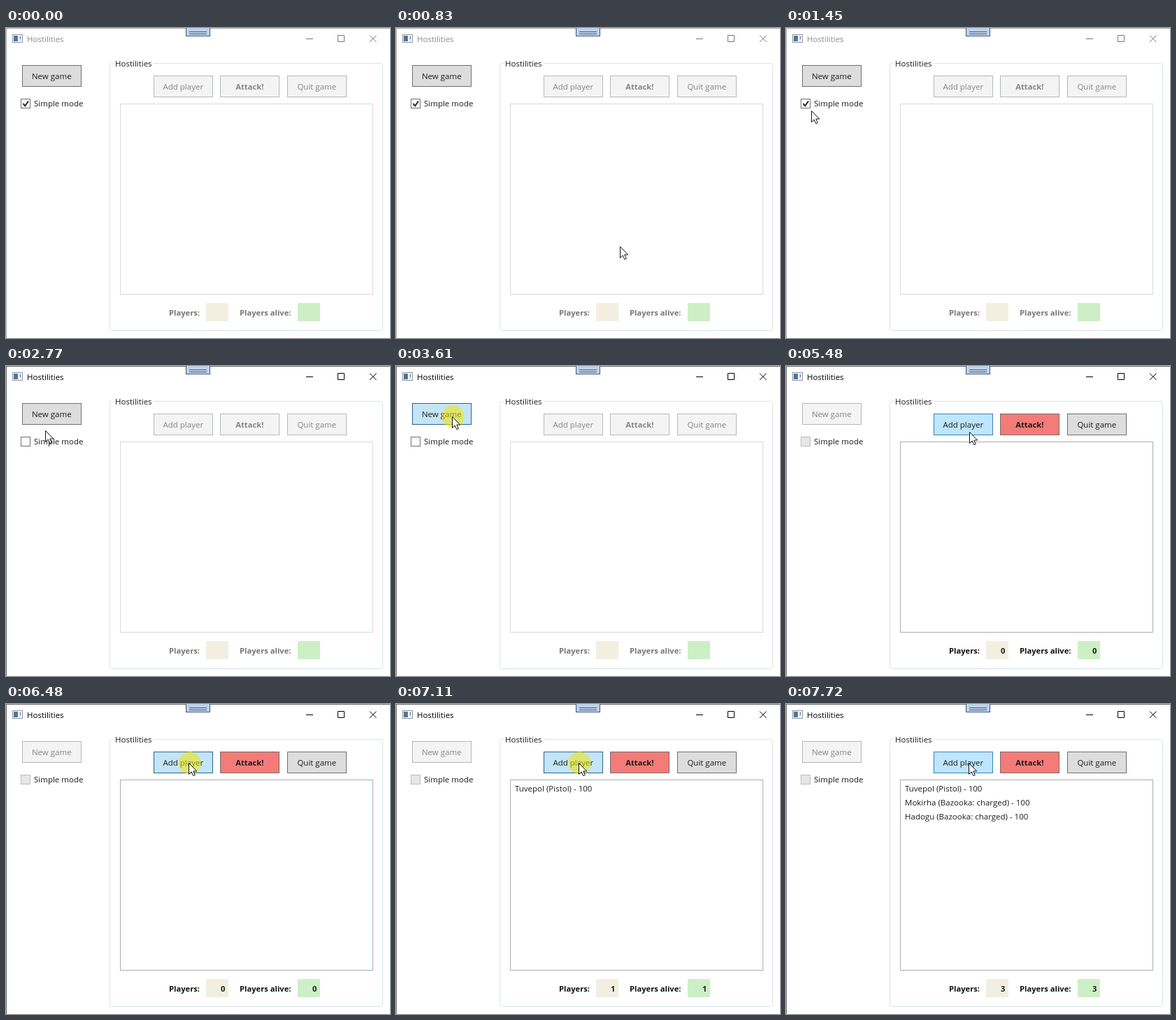
An HTML page that plays this animation: 549 by 443 pixels, repeating every 8 s.

```html
<!DOCTYPE html>
<html lang="en">
<head>
<meta charset="utf-8">
<title>Hostilities</title>
<style>
  html, body { margin: 0; width: 100%; height: 100%; overflow: hidden; background: #fff; }
  svg { display: block; }
  text { font: 11.5px "Open Sans", "Noto Sans", sans-serif; fill: #1c1c1c; white-space: pre; }
  .bold { font-weight: 700; font-size: 11.2px; }
  .mid { text-anchor: middle; }
  .end { text-anchor: end; }
  .line { fill: none; shape-rendering: crispEdges; }
</style>
</head>
<body>
<svg id="stage" width="549" height="443" viewBox="0 0 549 443"></svg>
<script>
const LOOP = 8000;
const STEP = 76;
const stage = document.getElementById('stage');

function add(tag, attrs, text) {
  const el = document.createElementNS('http://www.w3.org/2000/svg', tag);
  set(el, attrs);
  if (text) el.textContent = text;
  stage.appendChild(el);
  return el;
}
function set(el, attrs) {
  for (const key in attrs) el.setAttribute(key, attrs[key]);
}
const box = (x, y, width, height, fill, stroke = 'none', rx = 0) =>
  add('rect', { x, y, width, height, fill, stroke, rx });
const label = (x, y, text, cls = '') => add('text', { x, y, class: cls }, text);
const path = (d, stroke, fill = 'none') => add('path', { d, stroke, fill });

function button(x, y, text, cls, look) {
  return {
    rect: box(x + .5, y + .5, 84, 30, '#f4f4f4', '#adb2b5'),
    text: label(x + 42.3, y + 20.4, text, 'mid ' + cls),
    look
  };
}
const LOOKS = {
  off: ['#f4f4f4', '#b4b8bb', '#858585'],
  normal: ['#dddddd', '#707070'],
  green: ['#a5e697', '#707070'],
  red: ['#f37b78', '#707070'],
  hover: ['#bee6fd', '#3c7fb1'],
  down: ['#c4e5f6', '#2c628b']
};
function paint(btn, name) {
  const [fill, stroke, ink = '#1c1c1c'] = LOOKS[name];
  set(btn.rect, { fill, stroke });
  btn.text.style.fill = ink;
}

// Window frame
box(0, 0, 549, 443, '#fff');
const edge = add('path', { d: 'M0 .5H549M.5 0V443', class: 'line' });
box(9.5, 9.5, 14, 11, '#fff', '#8d9399');
box(11, 11, 6, 8, '#52719b');
box(18, 11, 4, 8, '#e3e8ee');
box(20, 12, 1, 4, '#52719b');
const title = label(30, 20, 'Hostilities');
const glyphs = [
  path('M429 15.5H439', '#777'),
  path('M474.5 10.5H483.5V19.5H474.5Z', '#777'),
  path('M520 10.5L529.5 20M529.5 10.5L520 20', '#777')
];
box(257.5, -.5, 34, 12, '#bdd2ea', '#42587b');
path('M262 5.5H287M262 8.5H287', '#42587b');

// Left column
const newGame = button(23, 53, 'New game', '', 'normal');
const check = box(21.5, 101.5, 13, 13, '#fff', '#707070');
const tick = path('M24.5 108L27.3 111.3L32 104.5', '#2b2b2b');
tick.setAttribute('stroke-width', 2);
label(40, 112, 'Simple mode');

// Group
box(148.5, 50.5, 390, 382, 'none', '#d9e3e8', 3);
box(154, 48, 57, 5, '#fff');
label(156, 55, 'Hostilities');
const addPlayer = button(211, 68, 'Add player', '', 'green');
const attack = button(306, 68, 'Attack!', 'bold', 'red');
const quit = button(402, 68, 'Quit game', '', 'normal');
const list = box(163.5, 108.5, 361, 272, '#fff', '#d9d9d9');
const rows = [
  'Tuvepol (Pistol) - 100',
  'Mokirha (Bazooka: charged) - 100',
  'Hadogu (Bazooka: charged) - 100'
].map((text, i) => label(170, 124.5 + 20 * i, text));
const captions = [label(233, 411, 'Players:', 'bold'), label(334, 411, 'Players alive:', 'bold')];
box(286, 393, 32, 26, '#f2efe1');
box(417, 393, 32, 26, '#cdefc5');
const counts = [313.5, 444.5].map(x => label(x, 411, '0', 'bold end'));

// Pointer
const halo = add('circle', { r: 16, fill: '#f2e600', 'fill-opacity': .55 });
const pointer = path('M.5 .5V16.5L4.2 13L6.8 18.6L9.3 17.5L6.8 12H11.7Z', '#111', '#fff');

const moves = [];
for (let i = 0; i <= 10; i++) {
  const u = i / 10, p = u * (1.5 - .5 * u * u);
  moves.push([530 + STEP * i, 532 - 485 * p, 432 - 275 * p]);
}
moves.push([1370, 41, 136], [1450, 36, 118], [1520, 32, 110], [1690, 32, 107],
  [2770, 56, 92], [2850, 68, 82], [2920, 77, 75], [3000, 80, 72]);
[[116, 93], [162, 125], [214, 164], [268, 200], [318, 226], [355, 235],
 [376, 226], [366, 198], [336, 162], [299, 126], [272, 104]]
  .forEach(([x, y], i) => moves.push([4560 + STEP * i, x, y]));
moves.push([5410, 264, 97], [5480, 262, 94], [5560, 261, 92], [5710, 261, 88], [5790, 261, 84]);

const clicks = [[1990, 2160], [3610, 3710], [6480, 6560], [7110, 7180], [7640, 7720]];
const joins = [6560, 7180, 7720];
const show = (el, on) => { el.style.display = on ? '' : 'none'; };

function draw(t) {
  const active = t >= 1990;
  const playing = t >= 3710;
  const pressed = clicks.some(([from, to]) => t >= from && t < to);
  const joined = joins.filter(at => t >= at).length;

  edge.setAttribute('stroke', active ? '#707070' : '#aaaaaa');
  title.style.fill = active ? '#000' : '#8c8c8c';
  glyphs.forEach(g => g.setAttribute('stroke', active ? '#000' : '#777'));

  const overNew = t >= 2850;
  paint(newGame, playing ? 'off' : !overNew ? 'normal' : pressed ? 'down' : 'hover');
  const overCheck = t >= 1520 && t < 2770;
  const checkLook = playing ? ['#e6e6e6', '#bcbcbc']
    : overCheck && pressed ? ['#d9ecff', '#3c77dd']
    : overCheck ? ['#f3f9ff', '#5593ff'] : ['#fff', '#707070'];
  set(check, { fill: checkLook[0], stroke: checkLook[1] });
  show(tick, t < 2160);

  for (const btn of [addPlayer, attack, quit]) paint(btn, playing ? btn.look : 'off');
  if (t >= 5410) paint(addPlayer, pressed ? 'down' : 'hover');
  list.setAttribute('stroke', playing ? '#abadb3' : '#d9d9d9');
  captions.forEach(c => { c.style.fill = playing ? '#111' : '#777'; });
  counts.forEach(c => { show(c, playing); c.textContent = joined; });
  rows.forEach((row, i) => show(row, i < joined));

  const at = moves.filter(m => t >= m[0]).pop();
  show(pointer, at);
  show(halo, at && pressed);
  if (at) {
    const x = Math.round(at[1]), y = Math.round(at[2]);
    pointer.setAttribute('transform', `translate(${x} ${y})`);
    set(halo, { cx: x + 1.5, cy: y });
  }
}

const start = performance.now();
function tickFrame() {
  draw((performance.now() - start) % LOOP);
  requestAnimationFrame(tickFrame);
}
draw(0);
requestAnimationFrame(tickFrame);
</script>
</body>
</html>
```
